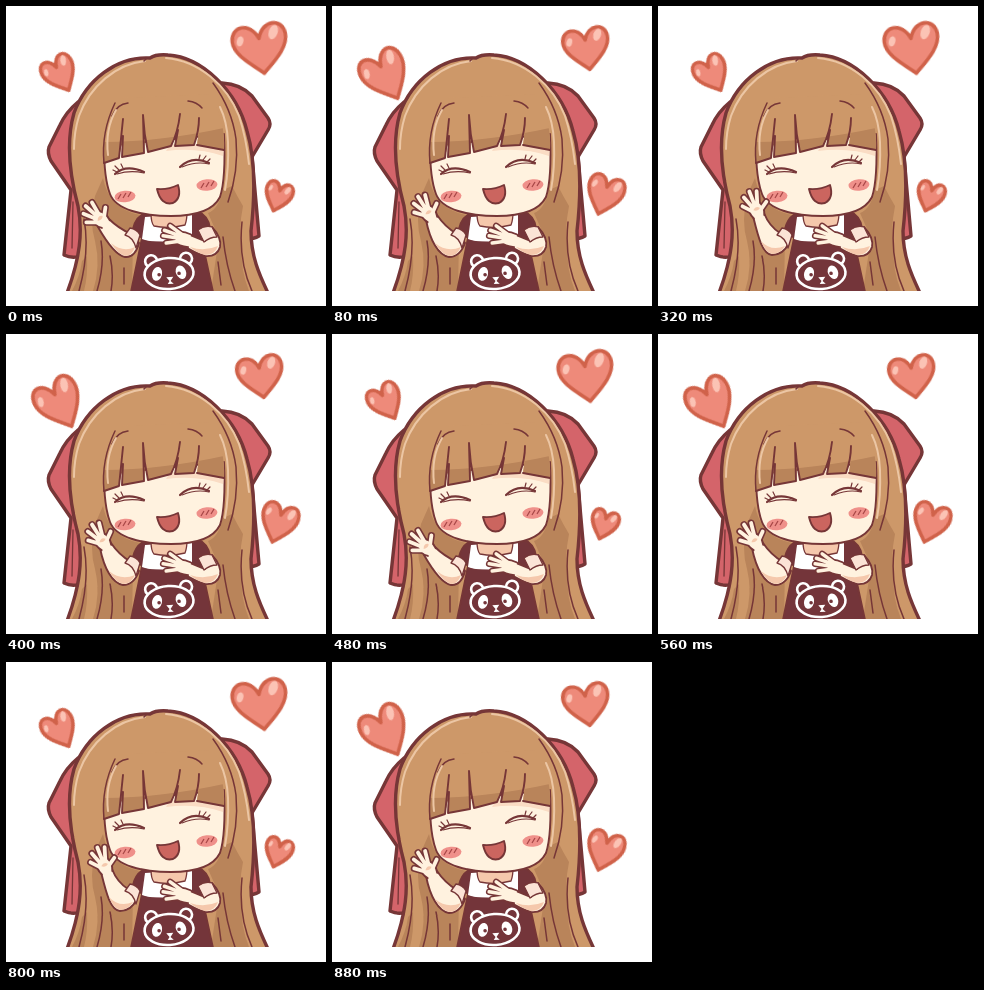
An HTML page that plays this animation: 320 px wide and 300 px high, repeating every 0.96 s.

```html
<!DOCTYPE html>
<html lang="en">
<head>
<meta charset="utf-8">
<title>Waving girl</title>
<style>
  html, body { margin: 0; width: 100%; height: 100%; overflow: hidden; background: #fff; }
  svg { display: block; width: 100vw; height: 100vh; }
  .ink { stroke: #763637; stroke-width: 1.9; stroke-linecap: round; stroke-linejoin: round; }
  .thin { stroke-width: 1.3; }
  .outer { stroke-width: 3.4; }
  .line { fill: none; }
  .hair { fill: #cd9869; }
  .shade { fill: #b9845a; }
  .skin { fill: #fff2df; }
  .peach { fill: #f5c8ac; }
  .red { fill: #d4646a; }
  .dark { fill: #74353a; }
  .white { fill: #fff; }
  .rim { fill: none; stroke: #ecc6a4; stroke-width: 2; stroke-linecap: round; }
  .strand { fill: none; stroke: #763637; stroke-width: 1.5; stroke-linecap: round; }
  .blush { fill: #ef908a; }

  .hand path { stroke-linecap: round; stroke-linejoin: round; }
  .hand .edge { fill: none; stroke: #763637; stroke-width: 7; }
  .hand .fill { fill: none; stroke: #fff2df; stroke-width: 3.8; }

  .beat { animation: beat 160ms step-end infinite; }
  @keyframes beat { 50% { transform: translate(var(--x), var(--y)) scale(var(--s)); } }

  .low { animation: low 480ms step-end infinite; }
  .mid { animation: mid 480ms step-end infinite; }
  .high { animation: high 480ms step-end infinite; }
  @keyframes low { 0% { visibility: visible; } 16.6667%, 100% { visibility: hidden; } }
  @keyframes mid {
    0%, 33.3333% { visibility: hidden; }
    16.6667%, 83.3333%, 100% { visibility: visible; }
  }
  @keyframes high {
    0%, 83.3333%, 100% { visibility: hidden; }
    33.3333% { visibility: visible; }
  }
</style>
</head>
<body>
<svg viewBox="0 0 320 300" preserveAspectRatio="none">
  <defs>
    <clipPath id="stage"><path d="M0 0H320V285H0Z"/></clipPath>
    <path id="hairShape" d="M144 52C111 50 80 74 68 107C60 135 64 170 72 200C77 226 74 252 61 287H262C253 268 245 250 245 225C249 190 249 152 241 125C231 85 196 51 162 49Q150 48 144 52Z"/>
    <path id="bangs" d="M98 157C96 130 102 107 117 92L203 88C214 104 219 122 218 144L191 139L193 124L188 139L169 140L172 122L165 140L142 146L139 126L138 147L116 151L117 130L113 152Z"/>
    <clipPath id="inBangs"><use href="#bangs"/></clipPath>
    <g id="heart">
      <path d="M0 44C-16 28 -49 6 -48 -19C-46 -47 -12 -50 0 -18C11 -50 46 -48 48 -20C50 5 18 28 0 44Z" fill="#ee8a7a" stroke="#d0624a" stroke-width="3.6" stroke-linejoin="round" vector-effect="non-scaling-stroke"/>
      <g fill="#fbc3b5">
        <ellipse cx="27" cy="-25" rx="8" ry="13" transform="rotate(28 27 -25)"/>
        <ellipse cx="-34" cy="-18" rx="6" ry="9" transform="rotate(25 -34 -18)"/>
      </g>
    </g>
    <g id="hand" class="hand">
      <path class="edge" d="M-3 -4L-12 -13M-2 -7L-8 -21M0 -8L-1 -25M2 -8L6 -23M4 -4L12 -10"/>
      <path class="skin ink" d="M-5 2Q-9 -5 -6 -11L5 -12Q9 -6 6 2"/>
      <path class="fill" d="M-3 -4L-12 -13M-2 -7L-8 -21M0 -8L-1 -25M2 -8L6 -23M4 -4L12 -10"/>
      <path class="peach" d="M-3 -6Q1 -10 4 -6Q1 -3 -3 -6"/>
    </g>
  </defs>

  <g clip-path="url(#stage)">
    <!-- ribbon -->
    <g class="ink outer red">
      <path d="M72 96Q60 106 54 119L43 141Q41 147 45 155L65 184L58 249Q66 253 75 250L80 180Z"/>
      <path d="M216 77Q235 78 246 90L262 112Q266 118 262 124L246 151L253 230Q248 233 240 233L232 140Z"/>
      <path class="line thin" d="M67 196L66 242"/>
    </g>

    <!-- hair -->
    <use href="#hairShape" class="ink outer hair"/>
    <path class="shade" d="M97 172Q103 203 134 209L127 232L126 285H87Q95 260 89 235Q83 215 89 190ZM217 184Q212 204 202 207L213 232L205 285H243Q234 262 236 242Q232 225 237 200Q231 190 226 180ZM76 255Q74 270 66 285H78Q82 270 81 250Z"/>
    <path class="rim" d="M139 55C110 58 84 80 73 110Q68 126 68 143M160 52C193 55 221 79 233 110Q240 131 243 158"/>
    <path class="strand" d="M78 213Q84 245 73 285M95 235Q99 258 91 285M104 250Q108 268 105 285M118 262L118 278M217 231Q220 260 229 285M236 216Q232 254 246 285M212 256L215 279M144 52Q141 51 138 55"/>

    <!-- body -->
    <path class="ink dark" d="M140 207Q130 210 127 223L136 232L125 286H207L197 240L204 222Q202 209 190 205Z"/>
    <path class="white" d="M139 211L136 233Q147 237 160 236L186 234L186 208Z"/>
    <path class="ink thin peach" d="M145 207Q145 217 148 220Q163 223 179 219Q181 214 181 206Z"/>
    <path class="dark" d="M136 234Q160 238 190 232L196 249H133Z"/>

    <!-- panda print -->
    <g transform="rotate(-4 163 267)">
      <g class="dark" stroke="#fff" stroke-width="2.6">
        <circle cx="146" cy="254" r="6"/>
        <circle cx="181" cy="254" r="6"/>
        <ellipse cx="163" cy="267.500" rx="24.500" ry="15.500"/>
      </g>
      <g class="white">
        <ellipse cx="151" cy="267" rx="5" ry="7" transform="rotate(18 151 267)"/>
        <ellipse cx="175" cy="267" rx="5" ry="7" transform="rotate(-18 175 267)"/>
        <path d="M160 271H167L164 275L167 278H161L163 275Z"/>
      </g>
      <g class="dark"><circle cx="153" cy="268" r="1.800"/><circle cx="173" cy="268" r="1.800"/></g>
    </g>

    <!-- resting arm -->
    <path class="ink skin" d="M198 222L206 221Q216 232 214 241Q211 251 199 250Q189 247 178 240L182 228L199 235Z"/>
    <path class="peach" d="M184 241Q198 246 212 240Q209 249 199 249Q191 247 184 241Z"/>
    <path class="ink thin" fill="#fbe3d6" d="M192 224Q199 219 206 221L211 231Q204 231 198 236Z"/>
    <g class="hand" transform="translate(180 234) rotate(-77) scale(.93)">
      <path class="edge" d="M-3 -7L-8 -20M0 -8L-1 -25M3 -8L5 -25M4 -4L11 -20"/>
      <path class="skin ink" d="M-7 4Q-8 -6 -5 -12L6 -12Q9 -5 7 4"/>
      <path class="fill" d="M-3 -7L-8 -20M0 -8L-1 -25M3 -8L5 -25M4 -4L11 -20"/>
    </g>

    <!-- face -->
    <path class="ink skin" d="M98 140Q98 172 104 188C110 204 137 210 165 210C190 210 207 205 214 191Q220 173 218 128Z"/>
    <path fill="#fadcc4" d="M164 138L218 140L217 150Q191 141 160 145Z"/>
    <use href="#bangs" class="hair"/>
    <g clip-path="url(#inBangs)"><path class="shade" d="M94 136Q155 136 222 121V160H94Z"/></g>
    <path class="ink line" d="M98 157L113 152L117 113M116 151L117 130M116 151L138 147L137 109Q138 128 142 146L165 140Q172 126 174 108M169 140L172 124M169 140L188 139Q193 125 193 112M191 139L218 144"/>
    <path class="strand" d="M98 157Q95 126 109 97M106 110Q111 98 122 97M182 95Q191 96 196 102M207 77Q226 103 230 133Q233 165 222 196"/>
    <path class="rim" d="M102 149Q99 123 110 104M214 101Q221 115 222 136Q223 162 219 184"/>

    <ellipse class="blush" cx="119" cy="190.500" rx="10.500" ry="5.800" transform="rotate(-5 119 190.500)"/>
    <ellipse class="blush" cx="201" cy="179" rx="10.500" ry="5.800" transform="rotate(-5 201 179)"/>
    <path class="line" stroke="#a94848" stroke-width="1.300" d="M115 188L112 193M120 187L117 192M125 186L122 191M198 177L195 182M203 176L200 181M208 175L205 180"/>
    <g class="ink line">
      <path stroke-width="2.200" d="M109 168Q120 158 138 166M174 161Q186 149 203 157"/>
      <path stroke-width="1.200" d="M111 168Q124 164 138 167M176 161Q190 155 203 158M111 166L107 164M113 164L109 160M117 162L115 158M201 156L204 153M197 154L200 150M193 153L194 149"/>
    </g>
    <path class="ink" fill="#cb655f" d="M151 183Q162 184 172 179Q176 192 167 197Q155 200 151 183Z"/>

    <!-- waving arm -->
    <g class="low">
      <path class="ink skin" d="M103 213Q112 222 125 228L133 237Q129 252 119 251Q108 249 92 221Z"/>
      <path class="peach" d="M105 237Q117 247 129 241Q126 250 119 250Q112 248 105 237Z"/>
      <use href="#hand" transform="translate(98 217) rotate(-45)"/>
    </g>
    <g class="mid">
      <path class="ink skin" d="M105 209Q113 221 125 228L133 237Q128 251 117 251C106 249 98 234 94 214Z"/>
      <path class="peach" d="M103 237Q115 247 129 241Q125 250 117 250Q109 248 103 237Z"/>
      <use href="#hand" transform="translate(99 212) rotate(-29)"/>
    </g>
    <g class="high">
      <path class="ink skin" d="M106 207Q111 220 122 227L131 237Q125 249 114 249C104 248 100 230 95 210Z"/>
      <path class="peach" d="M103 235Q113 246 127 240Q122 248 114 248Q107 246 103 235Z"/>
      <use href="#hand" transform="translate(100 209) rotate(-18)"/>
    </g>
    <path class="ink thin" fill="#fbe3d6" d="M124 222Q131 223 134 229L130 242Q127 231 119 229Z"/>
  </g>

  <!-- hearts -->
  <g transform="translate(52 66)"><g class="beat" style="--x:-1px;--y:1px;--s:1.38">
    <use href="#heart" transform="translate(2 2) rotate(-28) scale(.34 .42)"/>
  </g></g>
  <g transform="translate(254.500 42.500)"><g class="beat" style="--x:0px;--y:0px;--s:.84">
    <use href="#heart" transform="rotate(-9) scale(.56 .57)"/>
  </g></g>
  <g transform="translate(273.500 189.500)"><g class="beat" style="--x:1px;--y:-2px;--s:1.34">
    <use href="#heart" transform="translate(-1.500 1) rotate(18) scale(.28 .34)"/>
  </g></g>
</svg>
</body>
</html>
```
